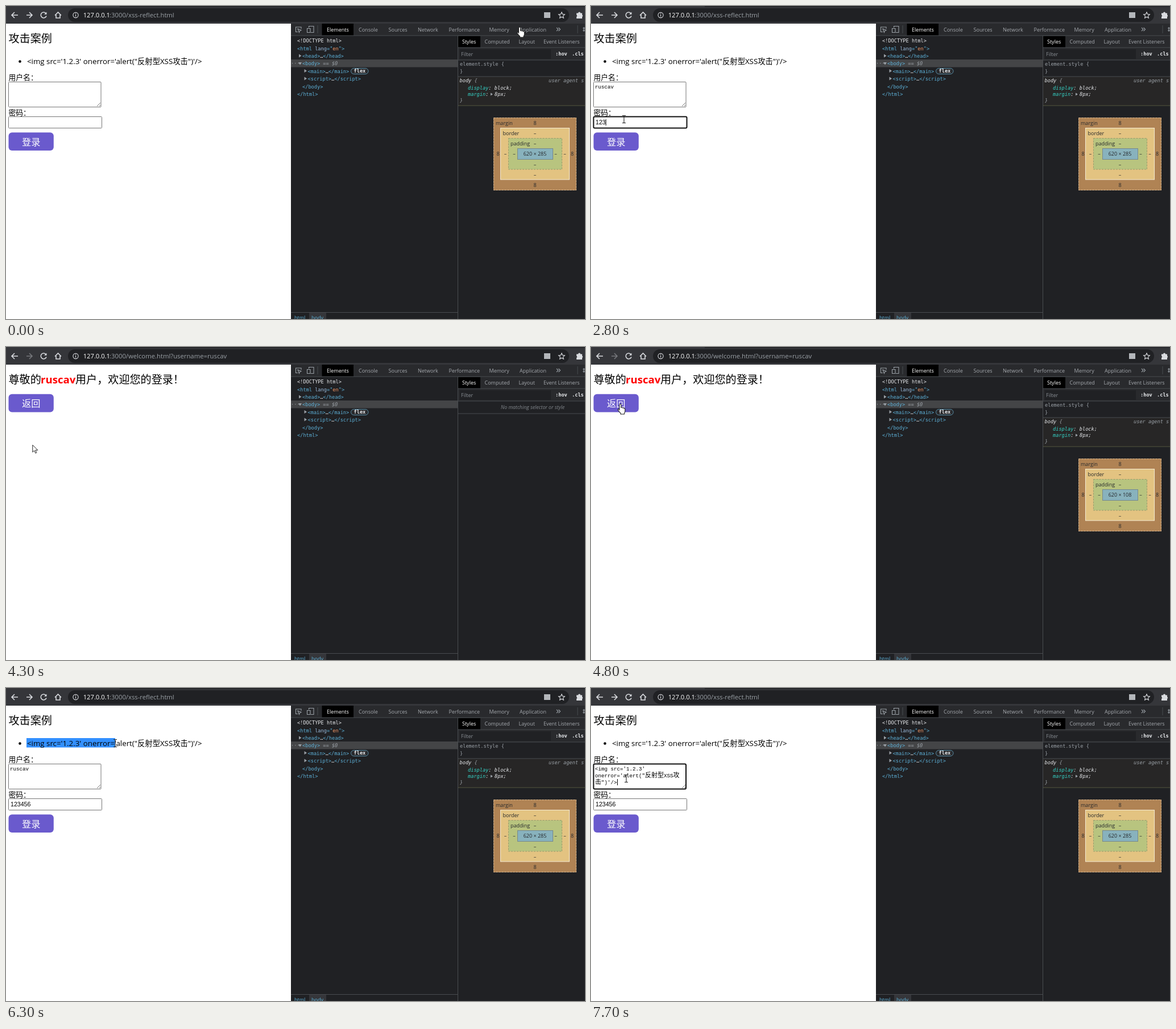
Animation, 1018 px wide and 550 px high, one loop 8 s. Source, as an HTML page:

```html
<!DOCTYPE html>
<html lang="zh-CN">
<head>
<meta charset="utf-8">
<title>XSS demo</title>
<style>
html, body { margin: 0; width: 100%; height: 100%; overflow: hidden; background: #fff; }
svg { display: block; width: 1018px; height: 550px; }
text { white-space: pre; font-family: "Open Sans", "Noto Sans CJK SC", "Noto Sans CJK", sans-serif; }
.mono { font-family: "DejaVu Sans Mono", monospace; }
.area { font-family: "Liberation Mono", "Noto Sans CJK SC", "Noto Sans CJK", monospace; }
.field { font-family: "Liberation Sans", sans-serif; }
.cjk { font-size: 11px; }
.b { font-weight: 700; }
.i { font-style: italic; }
.tag { fill: #5db0d7; }
.attr { fill: #9bbbdc; }
.val { fill: #f29766; }
.grey { fill: #9aa0a6; }
.prop { fill: #35d4c7; }
.line { fill: none; stroke: #dadce0; stroke-width: 1.6; }
.thin { fill: none; stroke: #9aa0a6; stroke-width: 1.1; }
</style>
</head>
<body>
<svg id="stage" viewBox="0 0 1018 550"></svg>
<script>
const LOOP = 8000, STEP = 100;
const USER = 'ruscav', PASS = '123456';
const stage = document.getElementById('stage');

// Text is placed by its left edge and the middle of its line.
const text = (x, mid, str, size, fill, cls = '', extra = '') =>
  `<text x="${x}" y="${mid + size * .36}" font-size="${size}" fill="${fill}" class="${cls}" ${extra}>${str}</text>`;
const rect = (x, y, x2, y2, fill, extra = '') =>
  `<rect x="${x}" y="${y}" width="${x2 - x}" height="${y2 - y}" fill="${fill}" ${extra}/>`;
const path = (d, cls = '', extra = '') => `<path d="${d}" class="${cls}" ${extra}/>`;
const group = (id, body) => `<g id="${id}">${body}</g>`;
const span = (cls, s) => `<tspan class="${cls}">${s}</tspan>`;
const tag = s => span('tag', `&lt;${s}&gt;`);
const mono = (x, mid, str, cls = '') => text(x, mid, str, 8.65, '#e8eaed', 'mono ' + cls);
const label = (x, mid, str, fill = '#a4a8ad') => text(x, mid, str, 9, fill);
const center = (x, mid, str) => text(x, mid, str, 9, '#26282b', '', 'text-anchor="middle"');

const button = (y, str) =>
  rect(4.5, y, 83.8, y + 31.8, '#6a5acd', 'rx="6"') + text(28, y + 16.6, str, 16.2, '#fff');

function browserBar() {
  return rect(0, 0, 1018, 31, '#35363a') + rect(200, 0, 1018, 1.5, '#202124') +
    rect(109, 4, 990, 28, '#202124', 'rx="12"') +
    path('M21 16H10M15 11L10 16L15 21', 'line') +
    `<g id="forward">${path('M36 16H46M41 11L46 16L41 21', 'line')}</g>` +
    path('M70.3 13A5 5 0 1 0 71 17.5', 'line') + path('M71.5 10.5V14.8H67.2Z', '', 'fill="#dadce0"') +
    path('M86 16.5L91.5 11L97 16.5M88 15.5V21H95V15.5', 'line') +
    '<circle cx="122.5" cy="16" r="4.6" class="line" style="stroke-width:1.1"/>' +
    path('M122.5 15.2V18.6M122.5 13V14.2', 'line', 'style="stroke-width:1.2"') +
    text(135.7, 15.8, '127.0.0.1', 11.2, '#fff', '', 'font-weight="500"') +
    text(182, 15.8, '', 11.3, '#9aa0a6', '', 'id="url"') +
    rect(946, 11, 957, 21, '#b4b7bb') +
    path('M977 10.8L978.6 14.4L982.4 14.8L979.5 17.4L980.4 21.2L977 19.2L973.6 21.2L974.5 17.4L971.6 14.8L975.4 14.4Z', 'line', 'style="stroke-width:1.1"') +
    path('M1003 12.5H1006A2 2 0 0 1 1010 12.5H1013V15.5A2 2 0 0 1 1013 19V22H1003V19A2 2 0 0 0 1003 15.5Z', '', 'fill="#dadce0"');
}

function formPage() {
  const snippet = `&lt;img src='1.2.3' onerror='alert("反射型XSS攻击")'/&gt;`;
  return group('form',
    text(4.5, 57, '攻击案例', 19.1, '#000') +
    '<circle cx="24.5" cy="97.5" r="2.3"/>' +
    rect(36, 88, 36, 104.5, '#3390ff', 'id="mark"') +
    text(37, 97, snippet, 13.3, '#000', '', 'id="snippet"') +
    text(4.5, 125.5, '用户名：', 12.8, '#000') +
    rect(4.5, 133.5, 167, 177.5, '#fff', 'stroke="#767676" id="area"') +
    path('M160 176L166 170M164 176L166 174', 'thin', 'style="stroke:#666;stroke-width:.9"') +
    rect(7, 136, 40.5, 147.5, '#3390ff', 'id="userMark"') +
    text(7, 142, '', 9.17, '#000', 'area', 'id="user"') +
    group('pasted',
      text(7, 142, `&lt;img src='1.2.3'`, 9.17, '#000', 'area') +
      text(7, 153.6, `onerror='alert("${span('cjk', '反射型')}XSS${span('cjk', '攻')}`, 9.17, '#000', 'area') +
      text(7, 165.2, `${span('cjk', '击')}")'/&gt;`, 9.17, '#000', 'area')) +
    text(4.5, 187, '密码：', 12.8, '#000') +
    rect(4.5, 194.5, 168.5, 214.5, '#fff', 'stroke="#767676" id="field"') +
    text(8, 204.3, '', 10.6, '#000', 'field', 'id="pass"') +
    rect(0, 0, 1, 11, '#000', 'id="caret"') +
    button(222.2, '登录'));
}

const welcomePage = () => group('welcome',
  text(4.5, 57, '尊敬的', 19.1, '#000') + text(61, 57, USER, 18.6, '#f00', 'b') +
  text(122, 57, '用户，欢迎您的登录！', 19.1, '#000') + button(82.7, '返回'));

function tree() {
  const closed = (x, y) => path(`M${x} ${y - 3}L${x + 4.5} ${y}L${x} ${y + 3}Z`, 'grey');
  return group('tree',
    rect(501, 94, 794, 107.5, '#444547') +
    mono(512, 61, '&lt;!DOCTYPE html&gt;') +
    mono(512, 74.5, span('tag', '&lt;html ') + span('attr', 'lang') + span('tag', '="') + span('val', 'en') + span('tag', '"&gt;')) +
    closed(515, 87.5) + mono(521, 88, tag('head') + '…' + tag('/head')) +
    mono(501, 101, span('grey', '···')) + path('M514 99L520 99L517 103.5Z', 'grey') +
    mono(521, 101, tag('body') + span('grey i', ' == $0')) +
    closed(524.5, 114) + mono(530.5, 114.5, tag('main') + '…' + tag('/main')) +
    rect(606.5, 109.5, 637, 119.5, '#292a2d', 'rx="5" stroke="#5a8fa8"') + mono(611.5, 114.3, 'flex', 'b') +
    closed(524.5, 127.5) + mono(530.5, 128, tag('script') + '…' + tag('/script')) +
    mono(521, 141.5, tag('/body')) + mono(512, 155, tag('/html')) +
    rect(533, 539, 563, 550, '#35363a') +
    label(507, 548, 'html', '#5db0d7') + label(537, 548, 'body', '#5db0d7'));
}

function boxModel() {
  const dash = color => `stroke="${color}" stroke-dasharray="3 2" stroke-width=".8"`;
  const mid = 930, row = 260;
  let out = rect(857, 196, 1003, 324, '#b08354') +
    rect(857.5, 196.5, 1002.5, 323.5, 'none', dash('#dcc4a4')) +
    rect(869.5, 214.5, 990.5, 305, '#e3c381', 'stroke="#f4ead2"') +
    rect(883.5, 232.5, 977.5, 287, '#b8c47f', dash('#8a9068')) +
    rect(899.5, 250.5, 961.5, 269.5, '#88b2bd', 'stroke="#76888e"') +
    text(861, 206, 'margin', 9, '#26282b') + text(873.5, 224, 'border', 9, '#26282b') +
    text(887, 242, 'padding', 9, '#26282b') +
    text(mid, row, '', 9, '#26282b', '', 'text-anchor="middle" id="size"');
  for (const [x, y] of [[mid, 206], [mid, 314.5], [865, row], [995.5, row]]) out += center(x, y, '8');
  for (const y of [224, 242, 278.5, 296.5]) out += center(mid, y, '–');
  for (const x of [878, 893.5, 966.5, 982.5]) out += center(x, row, '–');
  return out;
}

const styles = () => group('styles',
  mono(798, 102, span('grey', 'element.style {')) + mono(798, 115, span('grey', '}')) +
  rect(795, 124, 1018, 175, '#272626') +
  rect(795, 123.5, 1018, 124.5, '#494c50') + rect(795, 174.5, 1018, 175.5, '#55563f') +
  mono(797.5, 131, 'body ' + span('grey', '{'), 'i') + mono(954, 131, span('grey', 'user agent s'), 'i') +
  mono(812, 144, span('prop', 'display') + ': block;', 'i') +
  mono(812, 155, span('prop', 'margin') + ':', 'i') +
  path('M852 152.5L856 155L852 157.5Z', 'grey') + mono(859, 155, '8px;', 'i') +
  mono(798, 166, span('grey', '}'), 'i') + boxModel());

function devtools() {
  const tabs = [[564, 'Elements', '#fff'], [620, 'Console'], [672.5, 'Sources'], [724, 'Network'],
    [778.5, 'Performance'], [849.5, 'Memory'], [903, 'Application']];
  const side = [[802, 'Styles', '#fff'], [841.5, 'Computed'], [901.5, 'Layout'], [945, 'Event Listeners']];
  return rect(501, 31, 1018, 550, '#202124') + rect(501, 31, 1018, 52, '#292a2d') +
    rect(795, 52, 1018, 95, '#292a2d') +
    rect(555.5, 31, 611, 52, '#000') + rect(795, 53, 834, 73, '#000') +
    tabs.map(a => label(a[0], 41.5, ...a.slice(1))).join('') +
    side.map(a => label(a[0], 63, ...a.slice(1))).join('') +
    path('M513 45.5H509.5V37H519V40M513 40L519 42.6L516.4 43.8L515.4 46.4Z', 'thin') +
    path('M532.5 38V35.5H541V46.5H536M529.5 39.5H535V46.5H529.5Z', 'thin') +
    rect(547.5, 34, 548.5, 48, '#494c50') + rect(1004.5, 34, 1005.5, 48, '#494c50') +
    path('M968 38L971 41L968 44M971.5 38L974.5 41L971.5 44', 'thin') +
    path('M1014 39H1018M1014 43H1018M1016 37V45', 'thin') +
    rect(798, 76, 958, 93, '#202124') + label(800, 84.5, 'Filter', '#8b9096') +
    mono(966, 84, ':hov', 'b') + mono(995, 84, '.cls', 'b') +
    rect(501, 51.5, 1018, 52.5, '#494c50') + rect(795, 72.5, 1018, 73.5, '#494c50') +
    rect(795, 94.5, 1018, 95.5, '#494c50') +
    rect(501, 538, 794, 539, '#494c50') + tree() + styles() +
    group('noMatch', text(870, 106, 'No matching selector or style', 8.8, '#80868b', 'i') +
      rect(795, 116.5, 1018, 117.5, '#494c50')) +
    rect(794, 52, 795, 550, '#494c50');
}

const pointers = () => group('cursor',
  group('hand', path('M-1.5 9.5V1.5A1.5 1.5 0 0 1 1.5 1.5V6.5Q3 5.8 4 7Q5.6 6.4 6.4 7.6Q8.2 7.4 8.4 9V13Q8 15 7 16.4V18H.6V16.5Q-2 14-4 10.8Q-4.3 9.1-3 9Q-2.2 9.1-1.5 10.2Z', '', 'fill="#fff" stroke="#222" stroke-width="1.1"')) +
  group('arrow', path('M0 0V12.5L3 9.8L5 14.4L7 13.5L5 9H9Z', '', 'fill="#fff" stroke="#222" stroke-width="1"')) +
  group('beam', path('M-3-6.5H-1Q0-6.5 0-5.5Q0-6.5 1-6.5H3M0-5.5V5.5M-3 6.5H-1Q0 6.5 0 5.5Q0 6.5 1 6.5H3', '', 'fill="none" stroke="#222" stroke-width="1.1"')));

stage.innerHTML = rect(0, 0, 1018, 550, '#fff') + formPage() + welcomePage() + devtools() + browserBar() + pointers();
const el = {};
stage.querySelectorAll('[id]').forEach(n => el[n.id] = n);

const track = [[0, 903, 37], [500, 62, 158], [1600, 62, 158], [1900, 62, 160], [2100, 62, 160],
  [2600, 58, 201], [2700, 58, 201], [2800, 58, 199], [3200, 58, 199], [3600, 43, 230], [3900, 43, 230],
  [4800, 51.5, 100], [4900, 51.5, 101], [5500, 51.5, 101], [5900, 38, 97], [6000, 38, 97], [6600, 346, 97],
  [6900, 282, 110], [7000, 282, 110], [7400, 62, 159], [LOOP, 62, 159]];
const shapes = [[0, 'hand'], [100, 'arrow'], [500, 'beam'], [3400, 'arrow'], [3500, 'hand'], [4000, 'arrow'],
  [4700, 'hand'], [5700, 'arrow'], [5800, 'beam'], [6700, 'arrow'], [7400, 'beam']];
const focuses = [[0, ''], [500, 'area'], [2400, 'field'], [3500, ''], [7400, 'area']];
const userKeys = [700, 900, 1100, 1200, 1700, 1800];
const passKeys = [2500, 2600, 2800, 2900, 3100, 3200];

const current = (list, t) => list.filter(e => e[0] <= t).pop()[1];
const typed = (word, keys, t) => word.slice(0, keys.filter(k => k <= t).length);
const within = (t, a, b) => t >= a && t < b;
const show = (node, on) => node.setAttribute('display', on ? 'inline' : 'none');
const set = (node, attrs) => { for (const k in attrs) node.setAttribute(k, attrs[k]); };

function position(t) {
  const i = track.findIndex(k => k[0] > t);
  const [a, x, y] = track[i - 1], [b, x2, y2] = track[i];
  const p = (t - a) / (b - a);
  return [x + (x2 - x) * p, y + (y2 - y) * p];
}

function draw(t) {
  const welcome = within(t, 3800, 4900), pasted = t >= 7700;
  show(el.welcome, welcome);
  show(el.form, !welcome);
  el.url.textContent = welcome ? `:3000/welcome.html?username=${USER}` : ':3000/xss-reflect.html';
  el.forward.setAttribute('opacity', welcome ? .4 : 1);

  const noMatch = within(t, 4300, 4600) || within(t, 4900, 6100);
  show(el.tree, !within(t, 4900, 5600));
  show(el.noMatch, noMatch);
  show(el.styles, !noMatch);
  el.size.textContent = within(t, 4600, 4900) ? '620 × 108' : '620 × 285';

  const user = typed(USER, userKeys, t), pass = typed(PASS, passKeys, t);
  const userMarked = within(t, 7500, 7700);
  el.user.textContent = pasted ? '' : user;
  el.user.setAttribute('fill', userMarked ? '#fff' : '#000');
  el.pass.textContent = pass;
  show(el.userMark, userMarked);
  show(el.pasted, pasted);

  const focus = current(focuses, t);
  for (const id of ['area', 'field']) {
    const on = focus === id;
    set(el[id], { stroke: on ? '#101010' : '#767676', 'stroke-width': on ? 2 : 1, rx: on ? 2 : 1 });
  }
  show(el.caret, focus && !userMarked);
  if (focus === 'field') set(el.caret, { x: 8 + pass.length * 5.9, y: 199 });
  else set(el.caret, pasted ? { x: 46, y: 160 } : { x: 7 + user.length * 5.5, y: 136.5 });

  const [x, y] = position(t);
  const selecting = within(t, 6100, 7400);
  const end = t >= 6600 ? 346 : x;
  show(el.mark, selecting);
  el.mark.setAttribute('width', Math.max(0, end - 36));
  el.snippet.setAttribute('fill', selecting && t >= 6400 ? '#fff' : '#000');

  el.cursor.setAttribute('transform', `translate(${x.toFixed(1)} ${y.toFixed(1)})`);
  const shape = current(shapes, t);
  for (const id of ['hand', 'arrow', 'beam']) show(el[id], id === shape);
}

const start = performance.now();
function tick() {
  const t = (performance.now() - start) % LOOP;
  draw(Math.floor(t / STEP) * STEP);
  requestAnimationFrame(tick);
}
tick();
</script>
</body>
</html>
```
